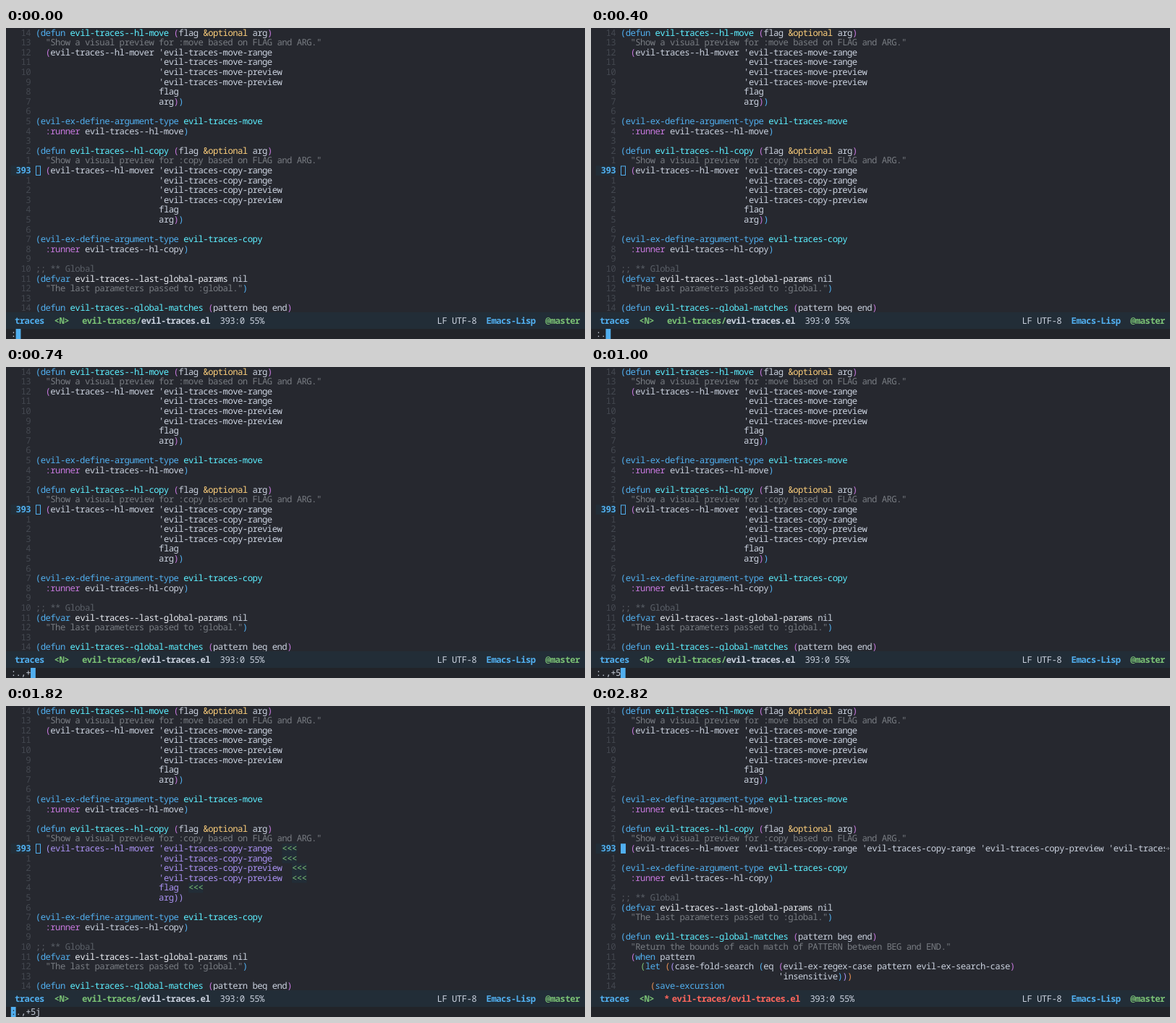
An HTML page that plays this animation: 800 by 430 pixels, repeating every 3220 ms.

```html
<!DOCTYPE html>
<html lang="en">
<head>
<meta charset="utf-8">
<style>
  html, body { margin: 0; width: 100%; height: 100%; overflow: hidden; background: #26282f; }
  svg { display: block; }
  text {
    font: 12.3px "Noto Sans Mono", monospace; letter-spacing: -.57px;
    text-rendering: geometricPrecision; white-space: pre;
  }
  .bold { font-weight: 700; }
</style>
</head>
<body>
<svg id="stage" width="800" height="430" viewBox="0 0 800 430"></svg>
<script>
const CHAR = 6.81, LINE = 13.607, LEFT = 6.8, CODE = LEFT + 5 * CHAR, CURRENT = 14;
const C = {
  fg: '#cad1de', blue: '#51afef', cyan: '#5cefff', green: '#7bc275', red: '#ff665c',
  yellow: '#fcce7b', magenta: '#c678dd', violet: '#a991f1', orange: '#e69055',
  variable: '#e9ecf2', doc: '#787c82', comment: '#5a5f67', number: '#444850',
  bg: '#26282f', bar: '#222d37', mini: '#222429'
};
const PARENS = [C.blue, C.magenta, C.green, C.orange, C.violet];
const KEYWORDS = /^(defun|defvar|when|let|save-excursion|evil-ex-define-argument-type)$/;

const pad = ' '.repeat(25);
const mover = '  (evil-traces--hl-mover ';
const args = name => ['range', 'range', 'preview', 'preview']
  .map(kind => `'evil-traces-${name}-${kind}`).concat('flag', 'arg))');
const call = name => args(name).map((arg, i) => (i ? pad : mover) + arg);
const header = name => [
  `(defun evil-traces--hl-${name} (flag &optional arg)`,
  `  "Show a visual preview for :${name} based on FLAG and ARG."`
];
const runner = name => [
  '', `(evil-ex-define-argument-type evil-traces-${name}`,
  `  :runner evil-traces--hl-${name})`, ''
];
const above = [...header('move'), ...call('move'), ...runner('move'), ...header('copy')];
const below = [
  ...runner('copy'), ';; ** Global', '(defvar evil-traces--last-global-params nil',
  '  "The last parameters passed to :global.")', '',
  '(defun evil-traces--global-matches (pattern beg end)'
];
const before = [...above, ...call('copy'), ...below];
const after = [
  ...above, mover + args('copy').join(' '), ...below,
  '  "Return the bounds of each match of PATTERN between BEG and END."',
  '  (when pattern',
  '    (let ((case-fold-search (eq (evil-ex-regex-case pattern evil-ex-search-case)',
  ' '.repeat(32) + "'insensitive)))",
  '      (save-excursion'
];

const escape = s => s.replace(/&/g, '&amp;').replace(/</g, '&lt;');
const text = (x, y, s, fill, bold) =>
  `<text x="${x}" y="${y}" fill="${fill}"${bold ? ' class="bold"' : ''}>${escape(s)}</text>`;
const rect = (x, y, w, h, fill) =>
  `<rect x="${x}" y="${y}" width="${w}" height="${h}" fill="${fill}"/>`;
const parenColor = depth => PARENS[depth % PARENS.length];

function drawCode(lines, preview) {
  let out = '', depth = 0;
  lines.forEach((line, row) => {
    const y = 10.5 + row * LINE, current = row === CURRENT;
    const label = String(current ? 393 : Math.abs(row - CURRENT));
    const marked = preview && row >= CURRENT && row < CURRENT + 6;
    out += text(LEFT + (4 - label.length) * CHAR, y, label, current ? C.blue : C.number, current);
    if (line[0] === '(') depth = 0;
    let previous = '';
    for (const { 0: token, index } of line.matchAll(/;;.*|"[^"]*"|[()]|[^\s()]+/g)) {
      let color = C.fg;
      if (token === '(') color = parenColor(depth++);
      else if (token === ')') color = parenColor(--depth);
      else if (token[0] === ';') color = C.comment;
      else if (token[0] === '"') color = C.doc;
      else if (token[0] === '&') color = C.yellow;
      else if (token[0] === ':') color = C.magenta;
      else if (KEYWORDS.test(token)) color = C.blue;
      else if (previous === 'defvar') color = C.variable;
      else if (/^(defun|evil-ex-define)/.test(previous)) color = C.cyan;
      out += text(CODE + index * CHAR, y, token, marked ? C.violet : color);
      previous = token;
    }
    if (marked && row < CURRENT + 5) {
      const x = CODE + (line.length + 2) * CHAR;
      out += rect(x, y - 10.8, 3 * CHAR, LINE, C.bar) + text(x, y, '<<<', C.green);
    }
  });
  return out;
}

function drawBar(modified) {
  const y = 409.2, shift = modified ? CHAR : 0, folder = 'evil-traces/';
  return rect(0, 393, 800, 23, C.bar) + rect(0, 416, 800, 14, C.mini) +
    text(12, y, 'traces', C.blue, true) + text(66.6, y, '<N>', C.green, true) +
    (modified ? text(101, y, '*', C.red, true) : '') +
    text(105 + shift, y, folder, modified ? C.red : C.green, true) +
    text(105 + shift + folder.length * CHAR, y, 'evil-traces.el', modified ? C.red : C.fg, true) +
    text(295.6 + shift, y, '393:0 55%', C.fg) + text(595.6, y, 'LF UTF-8', C.fg) +
    text(663.6, y, 'Emacs-Lisp', C.blue, true) + text(745.2, y, '@master', C.green, true);
}

function drawScene(step) {
  const joined = step === 6, preview = step === 5;
  let out = rect(0, 0, 800, 430, C.bg) + rect(LEFT, 190.3, 4 * CHAR, 13.7, C.bar);
  out += `<svg width="793" height="393">${drawCode(joined ? after : before, preview)}</svg>`;
  out += joined
    ? rect(41, 190.3, 7, 13.7, C.blue) +
      `<path d="M794 197h5m-2-2l2 2l-2 2" fill="none" stroke="${C.doc}"/>`
    : `<rect x="41.5" y="191" width="6" height="12.5" fill="none" stroke="${C.blue}"/>`;
  out += drawBar(joined);
  if (!joined) {
    const command = ':.,+5j'.slice(0, step + 1), column = preview ? 0 : command.length;
    out += rect(LEFT + column * CHAR, 416, CHAR, 14, C.blue);
    [...command].forEach((char, i) => {
      out += text(LEFT + i * CHAR, 426.8, char, i === column ? C.bg : C.fg);
    });
  }
  return out;
}

const stage = document.getElementById('stage');
const starts = [0, 240, 500, 740, 1000, 1220, 2220], LOOP = 3220;
let shown = -1;
function tick() {
  const time = performance.now() % LOOP;
  const step = starts.filter(start => start <= time).length - 1;
  if (step !== shown) stage.innerHTML = drawScene(shown = step);
  requestAnimationFrame(tick);
}
tick();
</script>
</body>
</html>
```
